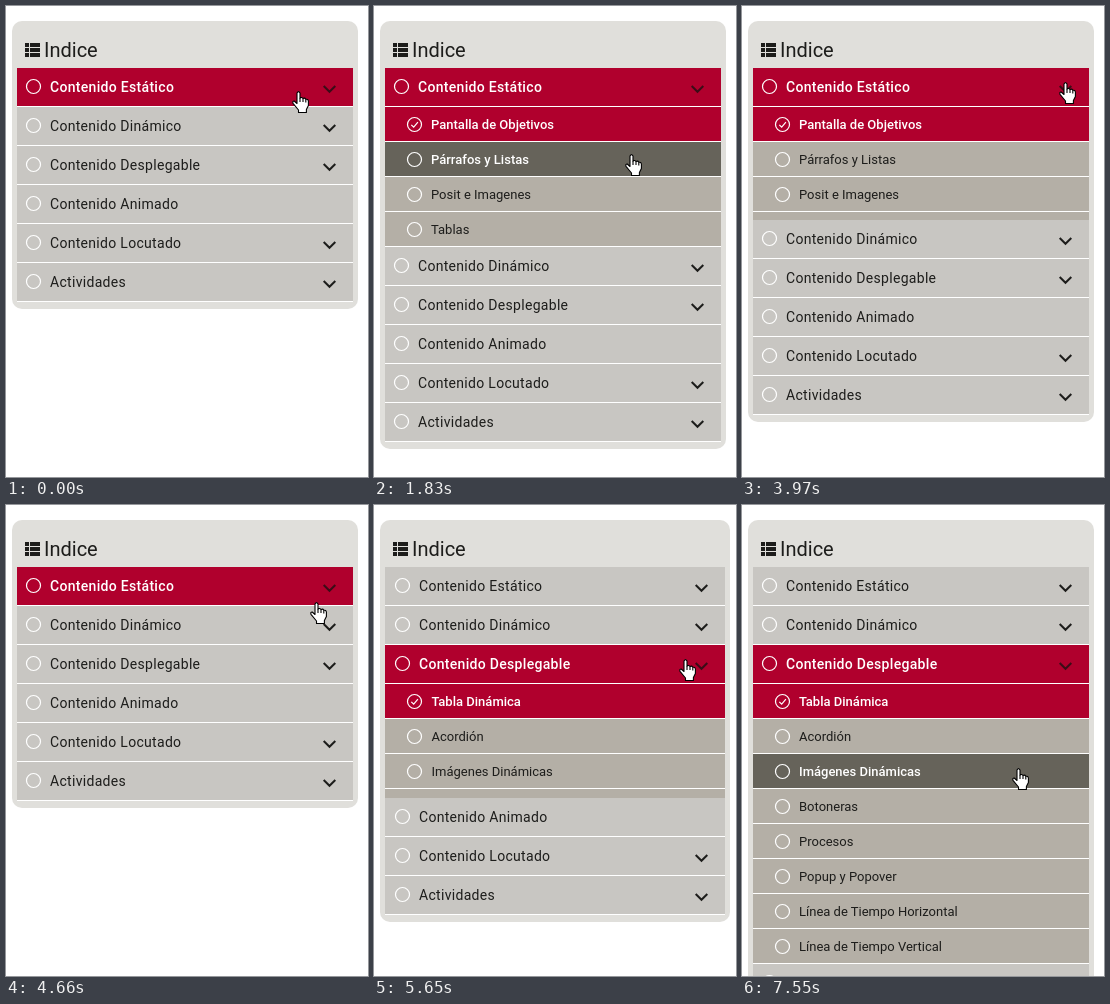
An HTML page that plays this animation: 362 px wide and 471 px high, repeating every 8 s.

```html
<!DOCTYPE html>
<html lang="es">
<head>
<meta charset="utf-8">
<title>Indice</title>
<style>
html, body { margin: 0; width: 100%; height: 100%; overflow: hidden; background: #fff; }
body { position: relative; font-family: Roboto, Arial, sans-serif; color: #1d1d1b; }
#panel { position: absolute; left: 6px; top: 15px; width: 336px; padding: 47px 5px 7px; border-radius: 10px; background: #e0dfdb; }
#panel.wide { width: 340px; }
h1 { position: absolute; left: 32px; top: 17px; margin: 0; font: 400 20px/24px Roboto, Arial, sans-serif; }
svg { position: absolute; overflow: visible; }
#icon { left: 13px; top: 22px; }
.row, .item { position: relative; border-bottom: 1px solid #fff; white-space: nowrap; }
.row { height: 38px; background: #c8c6c2; font-size: 14px; line-height: 38px; letter-spacing: .3px; padding-left: 33px; }
.item { height: 34px; background: #b4afa6; font-size: 13px; line-height: 35px; padding-left: 46px; }
.sub { overflow: hidden; background: #b4afa6; height: 0; }
.wide .row { padding-left: 34px; }
.wide .item { padding-left: 46.5px; }
.hover { background: #66635a; color: #fff; font-weight: 500; }
.active { background: #b0002d; color: #fff; font-weight: 500; }
.dot { left: 9px; top: 11px; fill: none; stroke: #fff; stroke-width: 1.2; }
.wide .row .dot { left: 10px; }
.item .dot { left: 22px; top: 10px; }
.arrow { right: 17px; top: 17px; fill: none; stroke: #1d1d1b; stroke-width: 2; }
.active .arrow { stroke: #3a0d17; }
#hand { left: 0; top: 0; fill: #fff; stroke: #000; stroke-width: 1.1; stroke-linejoin: round; }
</style>
</head>
<body>
<div id="panel">
  <svg id="icon" width="15" height="14" fill="#1d1d1b"><path d="M0 0h4v4H0zM5 0h10v4H5zM0 5h4v4H0zM5 5h10v4H5zM0 10h4v4H0zM5 10h10v4H5z"/></svg>
  <h1>Indice</h1>
</div>
<svg id="hand" width="17" height="22">
  <path d="M5 2Q6.5-.8 8 2V7Q10 5.8 11 7.5Q13 6.6 13.8 8.3Q16 7.8 16.4 10V14.5L14.4 18.5V21.5H6.5V19L1 12.3Q.2 10 2.2 10L5 12.5Z"/>
  <path d="M8 7v4M11 7.5V11M13.8 8.3V11.5" fill="none"/>
</svg>
<script>
const LOOP = 8000;
const menu = [
  ['Contenido Estático', ['Pantalla de Objetivos', 'Párrafos y Listas', 'Posit e Imagenes', 'Tablas']],
  ['Contenido Dinámico', []],
  ['Contenido Desplegable', ['Tabla Dinámica', 'Acordión', 'Imágenes Dinámicas', 'Botoneras', 'Procesos',
    'Popup y Popover', 'Línea de Tiempo Horizontal', 'Línea de Tiempo Vertical']],
  ['Contenido Animado'],
  ['Contenido Locutado', []],
  ['Actividades', []]
];
// Stepped tracks: [time, ...values], held until the next entry
const pointer = [
  [0, 286, 85], [1260, 278, 95], [1410, 265, 118], [1560, 257, 138], [1680, 252, 146], [1830, 251, 148],
  [2400, 245, 159], [2550, 243, 173], [2680, 243, 180], [3270, 301, 116], [3420, 312, 90], [3550, 317, 76],
  [4520, 311, 83], [4660, 304, 97], [4800, 302, 115], [4950, 304, 141], [5080, 305, 149], [5220, 305, 154],
  [5950, 304, 155], [6630, 299, 171], [6750, 291, 191], [6890, 287, 205], [7020, 283, 222], [7140, 279, 238],
  [7270, 274, 253], [7400, 271, 262], [7550, 270, 263]
];
const slides = {
  0: [[0, 0], [280, 1], [550, 110], [680, 140], [3970, 113], [4090, 65], [4250, 6], [4400, 1], [4520, 0]],
  2: [[0, 0], [5500, 5], [5650, 114], [5800, 252], [5950, 280]]
};

const panel = document.getElementById('panel');
const hand = document.getElementById('hand');
const dot = check => `<svg class="dot" width="15" height="15"><circle cx="7.5" cy="7.5" r="7"/>${
  check ? '<path d="M4.3 7.8l2.4 2.4 4.2-5"/>' : ''}</svg>`;
const arrow = '<svg class="arrow" width="13" height="8"><path d="M.7 1l5.8 5.8L12.3 1"/></svg>';

function add(parent, cls, html) {
  const el = document.createElement('div');
  el.className = cls;
  el.innerHTML = html;
  return parent.appendChild(el);
}

const rows = menu.map(([label, items]) => {
  const head = add(panel, 'row', dot() + label + (items ? arrow : ''));
  const sub = add(panel, 'sub', '');
  const list = (items || []).map((text, i) => add(sub, i ? 'item' : 'item active', dot(!i) + text));
  return { head, sub, list };
});

const at = (track, t) => track.findLast(k => k[0] <= t).slice(1);

function render(t) {
  const [x, y] = at(pointer, t);
  const active = t < 5500 ? 0 : 2;
  let top = 62;
  rows.forEach(({ head, sub, list }, i) => {
    const over = y + 1 >= top && y + 1 < top + 39;
    head.className = 'row' + (i === active ? ' active' : over ? ' hover' : '');
    top += 39;
    const height = slides[i] ? at(slides[i], t)[0] : 0;
    sub.style.height = height + 'px';
    const hit = y + 1 < top + height ? Math.floor((y + 1 - top) / 35) : -1;
    list.forEach((el, j) => j && el.classList.toggle('hover', j === hit));
    top += height;
  });
  panel.classList.toggle('wide', t >= 5500 && t < 5800);
  hand.style.transform = `translate(${x}px, ${y}px)`;
}

const start = performance.now();
function frame(now) {
  render(Math.max(0, now - start) % LOOP);
  requestAnimationFrame(frame);
}
render(0);
requestAnimationFrame(frame);
</script>
</body>
</html>
```
